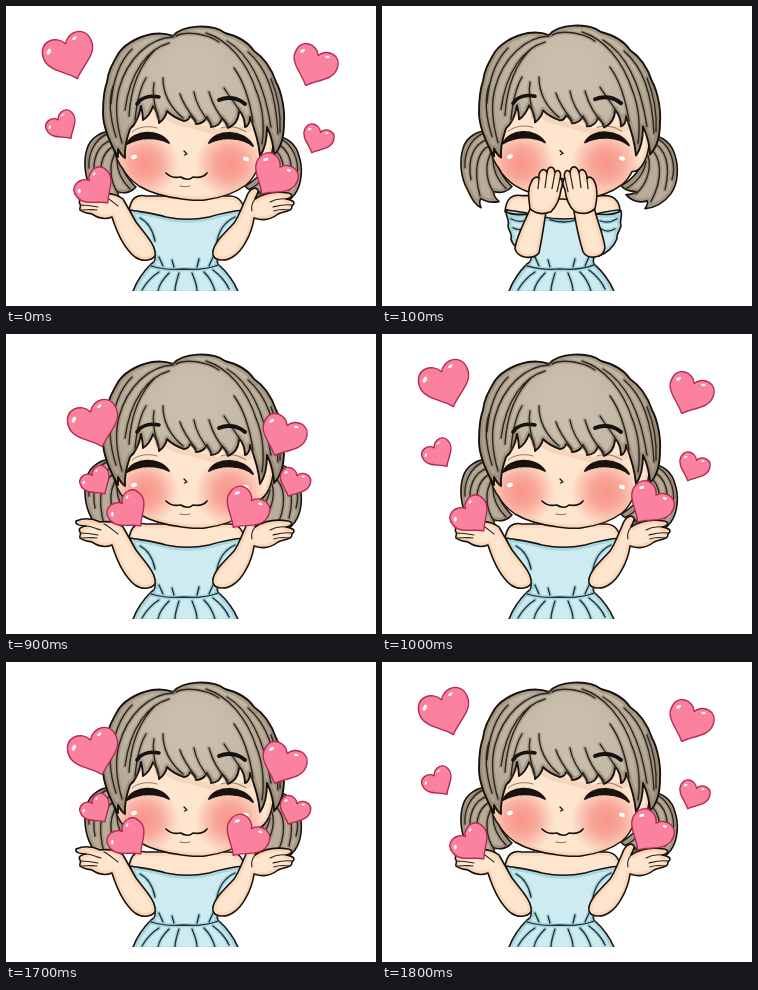
Recreate the animation shown at these times as an HTML page with a canvas. Size 370x300 px, loop 2000 ms.

```html
<!DOCTYPE html>
<html lang="en">
<head>
<meta charset="utf-8">
<title>Sending hearts</title>
<style>
html, body { margin: 0; width: 100%; height: 100%; overflow: hidden; background: #fff; }
canvas { display: block; width: 370px; height: 300px; }
</style>
</head>
<body>
<canvas id="stage" width="370" height="300"></canvas>
<script>
const ctx = document.getElementById('stage').getContext('2d');
const INK = '#17120f', SKIN = '#fde5ce', HAIR = '#b9ad99', DRESS = '#cdebf1';
const SKIN_RIM = 'rgba(244,190,150,.4)', DRESS_RIM = 'rgba(105,175,188,.35)', HAIR_RIM = 'rgba(112,98,82,.3)';
ctx.lineCap = ctx.lineJoin = 'round';

function line(d, color = INK, width = 1.4) {
  ctx.strokeStyle = color;
  ctx.lineWidth = width;
  ctx.stroke(new Path2D(d));
}

// Filled outline with a soft inner rim of shade
function shape(d, fill, rim, width = 1.6) {
  const p = new Path2D(d);
  ctx.fillStyle = fill;
  ctx.fill(p);
  ctx.save();
  ctx.clip(p);
  line(d, rim, 7);
  ctx.restore();
  line(d, INK, width);
}

function strands(d) {
  line(d, 'rgba(110,96,80,.28)', 4.5);
  line(d, '#2c2520', 1.4);
}

function folds(d) {
  line(d, 'rgba(90,160,175,.35)', 4);
  line(d, '#1b3034', 1.3);
}

function glow(x, y, r, color, alpha) {
  const g = ctx.createRadialGradient(x, y, 0, x, y, r);
  g.addColorStop(0, `rgba(${color},${alpha})`);
  g.addColorStop(.45, `rgba(${color},${alpha * .75})`);
  g.addColorStop(1, `rgba(${color},0)`);
  ctx.fillStyle = g;
  ctx.fillRect(x - r, y - r, 2 * r, 2 * r);
}

function dot(x, y, rx, ry, turn = 0) {
  ctx.beginPath();
  ctx.ellipse(x, y, rx, ry, turn, 0, 7);
  ctx.fillStyle = '#fff';
  ctx.fill();
}

function pigtails() {
  shape('M108 126C96 124 84 132 81 143C77 156 79 172 85 183C89 191 92 199 99 202C97 197 97 195 99 193C105 197 111 197 117 196C113 192 111 189 112 186C119 188 126 186 130 181C122 174 114 160 110 146Z', HAIR, HAIR_RIM);
  strands('M106 134C92 138 85 153 89 174M108 140C95 146 91 164 98 190M110 146C102 158 104 176 112 187M101 128C88 134 82 148 83 162M111 154C111 166 117 176 124 183');
  shape('M270 130C281 131 290 138 293 150C297 162 296 178 289 188C283 196 274 202 263 203C266 199 266 197 265 195C258 198 249 195 244 189C249 189 252 188 254 186C247 186 242 184 239 180C251 174 260 162 264 149Z', HAIR, HAIR_RIM);
  strands('M270 137C284 143 289 160 283 184M268 143C279 151 282 171 269 196M266 150C270 164 264 180 254 188M277 134C290 143 294 160 290 174M264 156C262 168 254 178 244 183');
}

function face() {
  const d = 'M105 116C105 133 108 152 117 163C120 169 126 175 133 180C146 188 160 191 176 193C186 194 193 195 199 194C214 192 228 188 240 179C245 175 248 170 250 166C258 167 265 155 267 140L265 80L115 80Z';
  const p = new Path2D(d);
  ctx.fillStyle = SKIN;
  ctx.fill(p);
  ctx.save();
  ctx.clip(p);
  glow(139, 158, 34, '246,116,110', .72);
  glow(224, 158, 35, '246,116,110', .72);
  line(d, 'rgba(240,185,150,.35)', 7);
  line('M112 122L134 108L150 100L166 114L210 126L247 122', 'rgba(236,190,155,.4)', 6);
  ctx.restore();
  line(d, INK, 1.5);

  const lids = new Path2D('M121 138C127 124 153 122 163 137C153 131 134 130 121 138ZM203 137C210 123 238 123 247 140C237 131 216 130 203 137Z');
  ctx.fillStyle = INK;
  ctx.fill(lids);
  ctx.strokeStyle = INK;
  ctx.lineWidth = 1.8;
  ctx.stroke(lids);
  line('M126 126C132 121 142 119 151 122M215 122C223 119 233 121 240 126', '#8c6a55', .9);
  line('M178 145L181 148L178.5 149', INK, 1.3);
  line('M160 167C164 171 170 172 175 171C179 174 184 174 187 171C193 172 198 171 201 167', INK, 1.7);
  line('M174 180C177 181 181 181 184 180', '#8c6a55', 1);
  dot(128, 151, 3, 2, -.3);
  dot(240, 153, 3, 2, .3);
}

function hair() {
  const g = ctx.createRadialGradient(186, 66, 15, 186, 85, 100);
  g.addColorStop(0, '#cbc0ae');
  g.addColorStop(.5, '#c3b7a4');
  g.addColorStop(1, '#a99d89');
  shape('M112 151C104 137 97 122 97 107C97 93 98 84 101 76C102 66 106 59 111 50C116 40 130 31 146 28C154 27 162 28 167 30C176 19 206 17 219 27C231 30 242 36 248 45C260 53 266 64 270 76C276 87 279 105 278 117C278 130 275 142 268 149C268 143 266 131 261 121C261 132 259 143 254 150C253 138 249 124 244 111C244 116 242 120 239 121C239 115 237 109 233 104C233 113 229 119 222 122C221 118 219 115 216 112C215 117 211 121 205 121C205 117 203 114 201 111C199 115 195 118 190 118C189 114 187 112 184 110C183 113 181 115 178 115C172 113 165 109 161 105C160 110 157 114 153 117C153 110 150 104 147 100C145 106 142 111 137 114C137 109 136 104 135 100C133 111 130 118 124 123C122 129 118 140 119 152C116 150 114 147 112 143Z', g, HAIR_RIM, 1.9);
  strands('M167 31C143 32 121 53 113 83M163 37C141 43 124 67 119 104M150 43C135 57 125 78 123 110M126 43C114 55 107 73 105 98M107 80C102 95 104 112 110 131M113 83C108 102 111 120 116 137');
  strands('M140 72C134 82 131 93 129 114M148 77C146 87 148 98 152 112M157 72C157 88 165 102 177 112M174 88C177 98 183 106 190 115M188 86C190 98 196 108 205 118M203 86C206 97 213 110 222 119M218 82C223 90 229 97 233 104');
  strands('M170 30C180 25 200 27 213 36M200 27C222 34 241 55 251 87M221 35C243 48 258 76 265 121M228 62C239 77 244 96 247 116M242 46C261 62 270 88 272 128M250 84C256 99 259 117 256 138M265 73C272 90 275 108 274 126');
  line('M131 98C135 92 143 89 153 91', INK, 3.6);
  line('M213 94C222 90 232 92 239 98', INK, 4);
}

function dress() {
  shape('M123 206C124 193 130 188 140 190L225 190C234 191 238 198 238 206L224 218L138 218Z', SKIN, SKIN_RIM);
  shape('M124 204C135 206 148 207 160 211C174 214 189 214 203 211C216 207 228 205 238 204C235 220 225 237 213 249C211 253 211 256 212 258C222 267 229 277 233 288L126 288C130 276 136 267 145 258C149 256 150 252 148 248C139 235 129 220 124 204Z', DRESS, DRESS_RIM);
  folds('M145 260C155 263 167 264 178 263C190 264 202 263 212 259M153 266C145 271 140 277 136 284M163 267C157 273 153 279 152 285M173 267C171 274 169 279 169 285M186 267C189 274 191 279 191 285M198 266C204 272 207 278 209 285M207 264C215 270 220 276 223 283M157 260L153 251M168 261L166 254M191 261L193 253M203 260L207 251M134 212C142 216 147 225 149 235M229 211C218 216 213 225 211 235');
}

function openArms() {
  shape('M106 211C111 227 119 243 129 251C136 256 145 255 149 250C151 240 139 228 130 216C125 207 121 200 117 193C111 188 102 187 94 188C86 184 77 184 70 187C69 190 73 192 80 192C74 193 72 195 74 198C76 200 73 201 74 204C77 207 82 207 86 208C92 212 99 214 106 211Z', SKIN, SKIN_RIM);
  line('M80 192C86 192 90 195 95 196M74 199C82 199 87 200 92 201M75 204C82 204 86 203 91 204M98 190C104 193 108 197 112 200', '#2b201a', 1.1);
  shape('M248 212C246 228 236 245 228 250C220 256 209 255 207 249C205 239 218 228 228 217C233 210 236 201 240 192C243 183 249 180 252 184C253 187 250 190 249 193C258 187 270 185 282 187C287 188 287 192 280 193C286 194 290 196 287 199C284 200 288 202 284 204C280 206 276 206 272 208C266 213 257 215 248 212Z', SKIN, SKIN_RIM);
  line('M280 193C273 192 268 194 264 196M286 199C277 198 271 200 267 201M283 204C276 203 272 203 268 205M249 193C246 197 245 201 246 205', '#2b201a', 1.1);
}

function closedArms() {
  shape('M124 206C131 210 142 209 152 208C152 223 149 238 146 248C139 245 130 240 129 233C131 228 126 225 126 220C128 216 124 211 124 206Z', DRESS, DRESS_RIM);
  shape('M210 208C220 209 231 210 239 205C241 210 237 215 239 220C238 225 234 228 235 233C232 241 224 248 217 250C212 237 210 222 210 208Z', DRESS, DRESS_RIM);
  folds('M129 213C136 217 141 216 145 214M131 222C136 225 140 224 143 222M235 213C229 217 223 217 218 215M233 223C228 226 223 226 219 223M168 214C176 217 187 217 194 214');

  shape('M149 201C143 216 134 231 133 243C136 253 151 254 157 247C160 233 162 219 164 206Z', SKIN, SKIN_RIM);
  shape('M212 201C215 216 222 230 223 242C221 253 206 254 201 246C197 233 194 219 192 206Z', SKIN, SKIN_RIM);
  shape('M148 203C147 194 145 184 149 177C151 172 155 170 157 173C156 165 162 161 165 167C166 160 172 160 173 167C176 162 180 167 178 173C181 174 181 180 179 184C178 192 175 200 169 206C161 209 153 208 148 203Z', SKIN, SKIN_RIM);
  shape('M213 203C215 194 216 184 213 177C211 172 207 170 205 173C205 165 199 161 197 167C195 160 189 159 188 167C185 162 181 167 183 173C180 175 181 180 183 184C184 193 187 201 193 206C200 209 208 208 213 203Z', SKIN, SKIN_RIM);
  line('M157 173L156 183M165 167L163 182M173 167L170 183M178 173L175 186M205 173L206 183M197 167L199 182M188 167L191 183M183 173L186 186', '#2b201a', 1.2);
}

const HEART = new Path2D('M0 -.24C-.1 -.46 -.5 -.48 -.5 -.11C-.5 .15 -.18 .27 0 .48C.18 .27 .5 .15 .5 -.11C.5 -.48 .1 -.46 0 -.24Z');

// x, y, size, turn, and the step from the far place to the near one
const hearts = [
  [63.5, 49.5, 51, -.33, 25, 40],
  [308, 59.5, 45, .4, -31, 42],
  [56.5, 120, 31, -.6, 34, 27.5],
  [311.5, 133, 31, .4, -23.5, 15.5],
  [89.5, 182, 40, -.7, 33, -5],
  [268, 170, 45, .6, -28.5, 5.5]
];

function heart(x, y, size, turn) {
  ctx.save();
  ctx.translate(x, y);
  ctx.rotate(turn);
  ctx.scale(size, size);
  ctx.fillStyle = '#fa829e';
  ctx.fill(HEART);
  ctx.strokeStyle = '#b52a55';
  ctx.lineWidth = 1.4 / size;
  ctx.stroke(HEART);
  dot(-.36, -.2, .06, .035, -.8);
  dot(.2, -.29, .05, .025, -.3);
  ctx.restore();
}

function draw(pose) {
  ctx.fillStyle = '#fff';
  ctx.fillRect(0, 0, 370, 300);
  ctx.save();
  ctx.beginPath();
  ctx.rect(0, 0, 370, 285);
  ctx.clip();
  if (pose === 'rise') {
    ctx.translate(0, 285);
    ctx.scale(1, 266 / 265);
    ctx.translate(0, -285);
  }
  const open = pose === 'near' || pose === 'far';
  pigtails();
  dress();
  face();
  hair();
  if (open) {
    openArms();
    const k = pose === 'near' ? 1 : 0;
    for (const [x, y, size, turn, dx, dy] of hearts) heart(x + k * dx, y + k * dy, size, turn);
  } else {
    closedArms();
  }
  ctx.restore();
}

const steps = [[100, 'far'], [400, 'rise'], [900, 'closed'], [1000, 'near'],
  [1200, 'far'], [1700, 'closed'], [1800, 'near'], [2000, 'far']];
const start = performance.now();
let shown;

function tick() {
  const t = (performance.now() - start) % 2000;
  const pose = steps.find(s => t < s[0])[1];
  if (pose !== shown) draw(shown = pose);
  requestAnimationFrame(tick);
}
tick();
</script>
</body>
</html>
```
